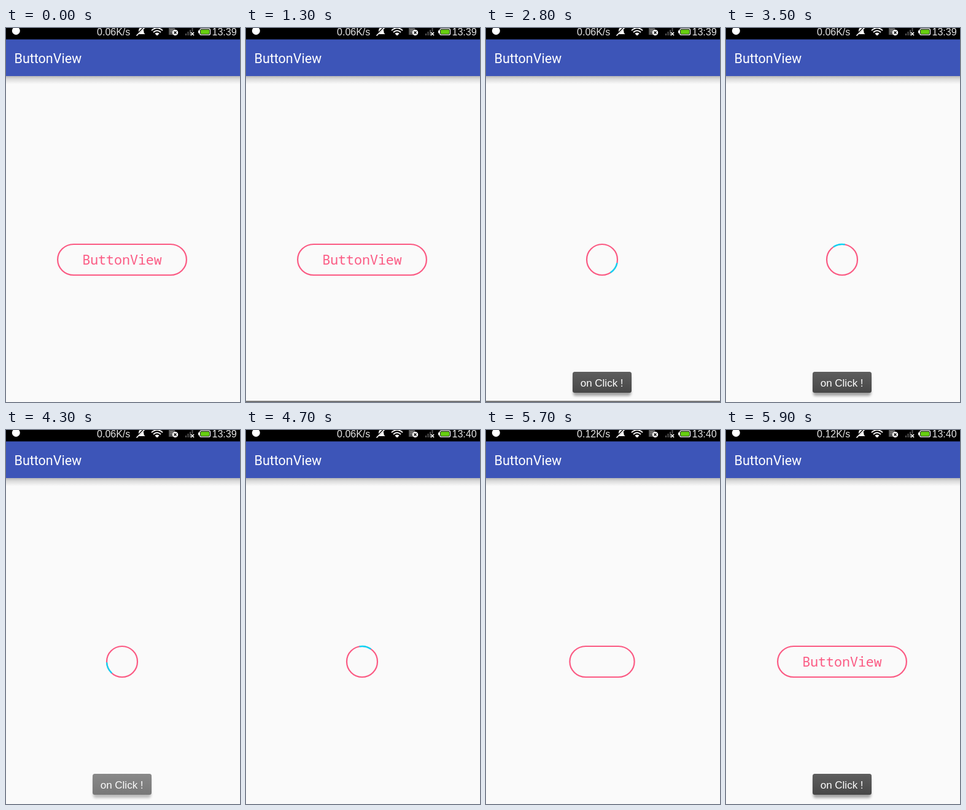
Write an HTML page that moves like this. It is 381 px wide and 607 px high and loops after 6.4 s.

```html
<!DOCTYPE html>
<html lang="en">
<head>
<meta charset="utf-8">
<title>Button animation</title>
<style>
  html, body { margin: 0; width: 100%; height: 100%; overflow: hidden; background: #fafafa; }
  svg { display: block; width: 100vw; height: 100vh; }
  .status { font: 16px "Liberation Sans", Arial, sans-serif; fill: #e6e6e6; }
  .title { font: 21.5px Roboto, sans-serif; fill: #fff; }
  .label { font: 21.6px "Noto Sans Mono", monospace; fill: #fb5a83; text-anchor: middle; }
  .message { font: 17px "Liberation Sans", Arial, sans-serif; fill: #fff; }
  .outline { fill: none; stroke: #fb5a83; stroke-width: 2.2; }
  .arc { fill: none; stroke: #0cd6f6; stroke-width: 2.4; }
  .line { fill: none; stroke: #fff; stroke-width: 1.7; }
</style>
</head>
<body>
<svg viewBox="0 0 381 607" preserveAspectRatio="none">
  <defs>
    <linearGradient id="barShade" x2="0" y2="1">
      <stop offset="0" stop-color="#000" stop-opacity=".27"/>
      <stop offset=".35" stop-color="#000" stop-opacity=".13"/>
      <stop offset="1" stop-color="#000" stop-opacity="0"/>
    </linearGradient>
    <linearGradient id="toastFill" x2="0" y2="1">
      <stop offset="0" stop-color="#5e5e5e"/>
      <stop offset="1" stop-color="#474747"/>
    </linearGradient>
    <filter id="blur" x="-10%" y="-30%" width="120%" height="160%">
      <feGaussianBlur stdDeviation="2.2"/>
    </filter>
  </defs>

  <rect width="381" height="607" fill="#fafafa"/>
  <rect y="78" width="381" height="13" fill="url(#barShade)"/>
  <rect y="18" width="381" height="60" fill="#3d55b8"/>
  <rect width="381" height="18.5" fill="#000"/>
  <text class="title" x="13.5" y="56.5">ButtonView</text>

  <!-- status icons -->
  <circle cx="16.3" cy="4.5" r="6.5" fill="#fff"/>
  <text class="status" id="speed" x="202.3" y="12" text-anchor="end"></text>
  <path d="M213 10 Q216 8 216 4 Q216 0 220 -1 Q224 0 224 4 Q224 8 226.500 10 Z" fill="#fff"/>
  <path d="M212 12 L226 -2" stroke="#000" stroke-width="3"/>
  <path class="line" d="M212.500 12.500 L226 -1"/>
  <path class="line" d="M237 4 Q246 -4 255 4 M240 7 Q246 1.500 252 7"/>
  <path d="M242.300 9 Q246 6 249.700 9 L246 12.500 Z" fill="#fff"/>
  <path d="M265 0 H275 V11 H265 Z" fill="#555"/>
  <path d="M267 3 H272 M267 6 H271" stroke="#999"/>
  <circle cx="275.500" cy="7.500" r="4.700" fill="#fff"/>
  <path d="M273.500 5.500 l4 4 m0 -4 l-4 4" stroke="#000" stroke-width="1.300"/>
  <path d="M293 12 V9 M296.500 12 V6 M300 12 V3 M303.500 6 V0" stroke="#555" stroke-width="2"/>
  <path class="line" d="M301 7 l5 5 m0 -5 l-5 5"/>
  <rect x="315.500" y="1.200" width="17" height="10" rx="2.500" class="line" style="stroke-width:1.300"/>
  <rect x="313" y="4" width="2" height="4.500" fill="#fff"/>
  <rect x="317" y="2.700" width="14" height="7" rx="1" fill="#67cf10"/>
  <text class="status" id="clock" x="335.500" y="12"></text>

  <rect class="outline" id="pill" y="351" height="50" rx="26" ry="25"/>
  <text class="label" id="label" x="189" y="384">ButtonView</text>
  <path class="arc" id="arc" d="M214 376 A25 25 0 0 1 206.700 393.700"/>

  <g id="toast">
    <rect x="142" y="563" width="94" height="34" rx="4" fill="#000" opacity=".35" filter="url(#blur)"/>
    <rect x="141" y="558" width="96" height="34" rx="3.500" fill="url(#toastFill)"/>
    <text class="message" x="153.700" y="582">on Click !</text>
  </g>
  <rect id="edge" y="605" width="381" height="2" fill="#787878"/>
</svg>
<script>
  const LOOP = 6400, STEP = 100;
  const el = id => document.getElementById(id);
  const [speed, clock, pill, label, arc, toast, edge] =
    ["speed", "clock", "pill", "label", "arc", "toast", "edge"].map(el);

  const within = (t, from, to) => t >= from && t < to;
  const show = (node, on) => node.setAttribute("visibility", on ? "visible" : "hidden");
  const ease = p => (1 - Math.cos(Math.PI * Math.min(1, Math.max(0, p)))) / 2;

  // 1 is the full button, 0 the ring
  function openness(t) {
    if (t < 2400 || t >= 5900) return 1;
    return t < 5500 ? 1 - ease((t - 2370) / 430) : ease((t - 5460) / 600);
  }

  function toastAlpha(t) {
    if (within(t, 2800, 4300) || t >= 5900) return 1;
    if (within(t, 2700, 2800) || within(t, 5800, 5900)) return 0.5;
    if (within(t, 4300, 4500)) return t < 4400 ? 0.72 : 0.35;
    return 0;
  }

  function draw(t) {
    const half = 25 + 79.9 * openness(t);
    pill.setAttribute("x", 189 - half);
    pill.setAttribute("width", 2 * half);
    pill.setAttribute("rx", Math.min(26, half));
    show(label, t < 2400 || t >= 5900);

    show(arc, within(t, 2800, 5500));
    arc.setAttribute("transform", `rotate(${12 + 0.32 * (t - 2800)} 189 376)`);

    const alpha = toastAlpha(t);
    const rising = within(t, 2700, 2800) || within(t, 5800, 5900);
    toast.setAttribute("opacity", alpha);
    toast.setAttribute("transform", `translate(0 ${rising ? 10 : 0})`);

    show(edge, within(t, 1300, 3000));
    speed.textContent = t < 5300 ? "0.06K/s" : "0.12K/s";
    clock.textContent = t < 4400 ? "13:39" : "13:40";
  }

  const start = performance.now();
  function tick() {
    const t = (performance.now() - start) % LOOP;
    draw(Math.floor(t / STEP) * STEP);
    requestAnimationFrame(tick);
  }
  tick();
</script>
</body>
</html>
```
